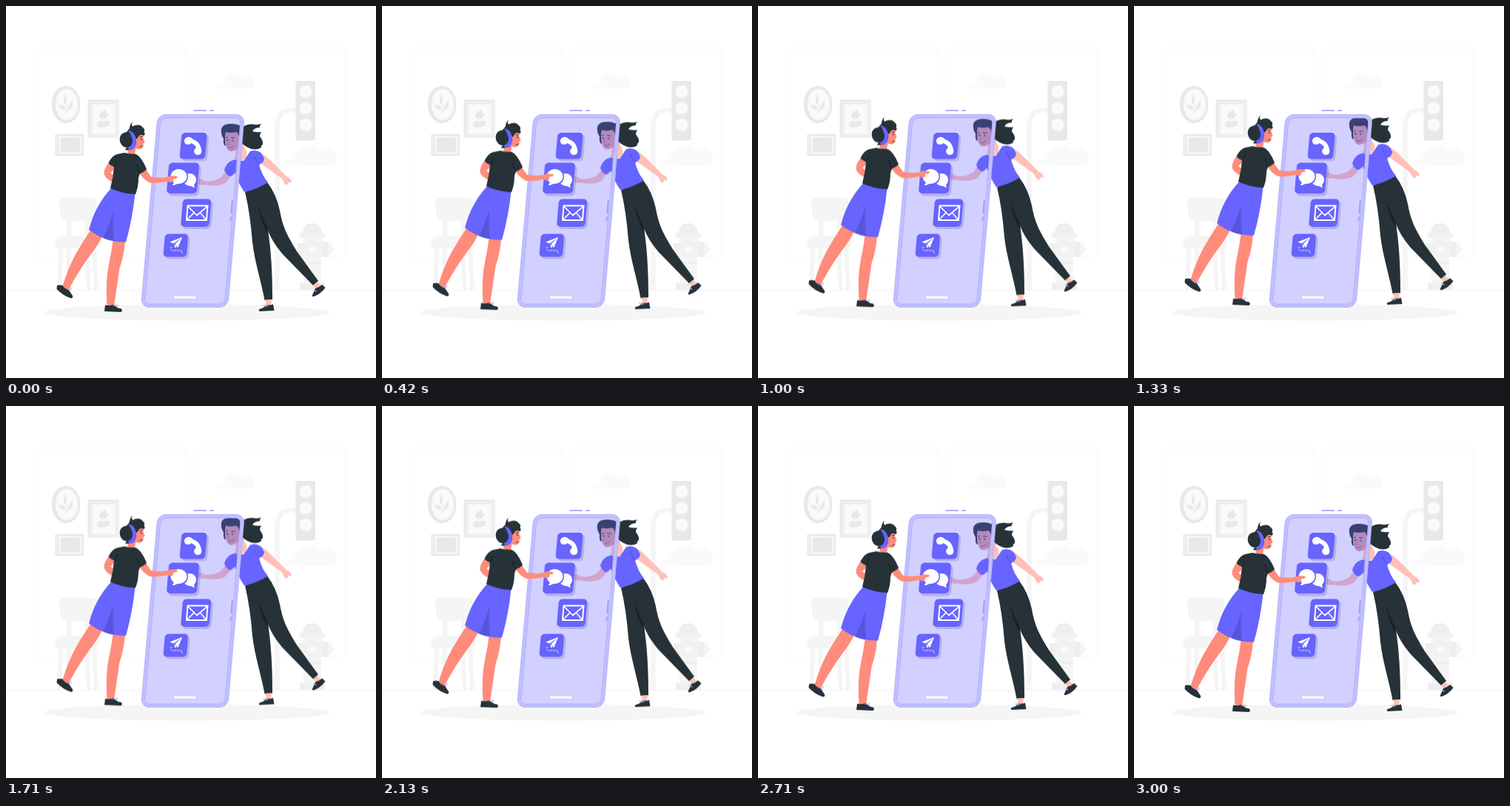
Recreate the animation shown at these times as an HTML page. Size 500 by 502 pixels, loop 3.04 s.

```html
<!DOCTYPE html>
<html lang="en">
<head>
<meta charset="utf-8">
<title>Calling through the phone</title>
<style>
html, body { margin: 0; width: 100%; height: 100%; overflow: hidden; background: #fff; }
svg { display: block; width: 500px; height: 502px; }
.float { animation: float 3040ms linear infinite; }
@keyframes float {
  0%, 98.68%, 100% { transform: translateY(0); }
  49.34% { transform: translateY(-10px); }
}
.line { fill: none; stroke-linecap: round; stroke-linejoin: round; }
.violet { fill: #6764ff; }
.dark { fill: #263238; }
.coral { fill: #ff8b7b; }
.pink { fill: #ffc0b7; }
.g1 { fill: #e8e8e8; }
.g2 { fill: #efefef; }
.g3 { fill: #f5f5f5; }
.g4 { fill: #fafafa; }
</style>
</head>
<body>
<svg viewBox="0 0 500 502">
  <defs>
    <g id="bubble">
      <ellipse rx="11" ry="10"/>
      <path d="M-7 5Q-6 9 -9 12Q-3 12 0 8z"/>
    </g>
  </defs>

  <!-- room and street -->
  <g class="line" stroke="#f9f9f9">
    <path d="M39.500 57H242V338H39.500zM255 57H458V338H255z"/>
    <path d="M0 383.500H500" stroke="#f4f4f4"/>
  </g>

  <g id="pictures">
    <ellipse class="g1" cx="81" cy="133" rx="19.300" ry="25.300"/>
    <ellipse class="g3" cx="82" cy="133" rx="15.500" ry="21.500"/>
    <ellipse class="g4" cx="82" cy="133" rx="14" ry="20"/>
    <path class="line" d="M82 143Q80 132 80 122M82 143Q76 140 73 133M82 143Q88 138 89 131" stroke="#e8e8e8"/>
    <path class="g1" d="M80 133Q76 126 80 120Q85 127 80 133zM81 140Q73 140 71 134Q78 133 81 140zM83 141Q84 131 90 127Q92 137 83 141z"/>
    <path class="g1" d="M110.500 126.500H152.500V177.500H110.500z"/>
    <path class="g2" d="M113 129H152.500V177.500H113z"/>
    <path class="g4" d="M117 133H147.500V172.500H117z"/>
    <path class="g1" d="M133 140L139 147L134 152Q126 153 126 146zM122 160Q127 153 132 156Q137 152 141 158Q137 165 130 163Q125 166 122 160z"/>
    <path class="g1" d="M66.500 173H105V202H66.500z"/>
    <path class="g3" d="M71 175H103V200H71z"/>
    <path class="g1" d="M74.500 178H99.500V197H74.500z"/>
    <path class="g2" d="M67.500 174H70V201H67.500z"/>
  </g>

  <g id="chair">
    <path class="g3" d="M82 286H88.500V313H82zM107 286H113V313H107z"/>
    <path class="g3" d="M78 259H116Q123 259 122.500 266L121 284Q120.500 290 114 290H81Q75 290 74 284L72 266Q72 259 78 259z"/>
    <path class="g3" d="M71 322H78L75 383.500H68.500zM82 322H88L87 383.500H81zM106 322H112L115 383.500H109zM116 322H122L125 383.500H119z"/>
    <path class="g3" d="M66 319Q68 310 80 310H114Q125 310 126 319Q126 327 118 327H72Q64 327 66 319z"/>
  </g>

  <g id="street">
    <path class="g4" d="M283 110Q286 104 295 104Q298 90 308 90Q315 90 317 97Q325 91 332 95Q337 100 335 108Q333 112 325 112H285z"/>
    <path class="g4" d="M376 215Q378 209 386 207Q389 195 398 196Q404 186 414 188Q420 189 422 196Q436 187 445 197Q449 206 445 212Q441 216 432 216z"/>
    <path class="line" style="stroke-linecap:butt" d="M393 140.500H385Q366.500 141 366.500 163V383.500" stroke="#f5f5f5" stroke-width="6.500"/>
    <rect class="g1" x="391.500" y="101" width="26.500" height="80.500" rx="2"/>
    <g class="g2"><circle cx="405" cy="116" r="9"/><circle cx="405" cy="138.500" r="9"/><circle cx="405" cy="161" r="9"/></g>
    <g class="g4"><circle cx="405" cy="115" r="8"/><circle cx="405" cy="137.500" r="8"/><circle cx="405" cy="160" r="8"/></g>
    <g id="hydrant">
      <path class="g3" d="M402 317H426V383.500H402z"/>
      <path class="g2" d="M401 307Q402 293 414 293Q426 293 427 307zM397 306H431V312H397zM397 374H431V383.500H397zM394 320H402V338H394zM426 318H436V339H426z"/>
      <path class="g3" d="M436 321H440L443 328L440 335H436zM400 312H428V318H400z"/>
      <path class="g2" d="M402 344H426V348H402z"/>
      <circle class="g2" cx="414" cy="328" r="11"/>
      <circle class="g3" cx="414" cy="328" r="7.500"/>
      <circle cx="414" cy="328" r="2.500" fill="#fff"/>
    </g>
  </g>

  <ellipse class="g3" cx="245" cy="413.500" rx="193" ry="11"/>

  <!-- woman behind the phone -->
  <g class="float">
    <path class="dark" d="M314 168Q322 159 333 159.500Q340 161 345 159Q342 162 343 164Q336 164 333 169Q339 171 345 170Q343 173 343 176Q348 182 347 187Q344 188 345 191Q337 196 327 191Q320 187 316 184z"/>
    <path class="pink" d="M342 197Q350 201 357 208L379 230Q385 232 386 237Q383 240 381 237Q382 241 378 241.500Q374 236 373 233L345 213z"/>
    <path class="pink" d="M297 223L291 231Q280 238 268 236Q263 232 259.500 233Q262 236 259 238Q261 243 268 241Q284 245 296 239Q302 233 306 226z"/>
    <path class="dark" d="M323 251L353 238Q365 253 370 276C374 298 379 308 393 331L422 371L415 377L373 334Q359 317 354 303Q360 340 360 396L349.500 397C345 372 336 345 333 319Q330 280 323 251z"/>
    <path d="M341 271Q345 294 355 309L353 299Q347 287 341 271z" fill="#172126"/>
    <path class="pink" d="M350.500 396.500L359 396L358 405L352 405zM415 377L421 372.500L426 379L420 383z"/>
    <path class="dark" d="M342.500 409Q350 407 351 403.500Q356 404.500 361 402.500L362.500 411L342.500 412Q341 411 342.500 409zM414 390Q417 384 418 381Q423 380 427 376L431.500 380Q425 389 416 392Q413 392.500 414 390z"/>
    <path class="line" d="M348 404L353 405M416 383L419 385" stroke="#aaa9ff" stroke-width="1.300"/>
    <path class="violet" d="M310 207L321 209L330 196Q344 192 349 206Q348 212 342 214Q346 229 354 238Q340 247 322 251Q314 239 309 225Q306 230 302 230Q296 226 295 221Q298 212 304 209z"/>
    <path class="line" d="M342 214Q337 209 336 203M310 225Q310 219 313 215" stroke="#4c48d8" stroke-width=".8"/>
    <path class="pink" d="M309 188Q312 199 309 207Q317 212 323 206Q326 201 325 195Q321 192 321 184z"/>
    <path d="M296.500 169Q295 184 299 193Q303 199 310 194Q316 192 317 183V167z" fill="#d69c9f"/>
    <path class="dark" d="M291 166Q293 159 303 159Q316 158 322 167Q324 176 321 187Q317 185 315 178Q315 172 311 170Q303 172 297 170Q295 177 297 189Q293 188 294 179Q290 173 291 166z"/>
    <g class="line" stroke="#263238" stroke-width="1">
      <path d="M297 178L299.500 177M304.500 177.500L309 178"/>
      <path d="M301 181L299.500 187H302" stroke="#b96d70" stroke-width=".8"/>
      <path d="M301 191Q305 192.500 308 189" stroke="#a4485a"/>
    </g>
    <circle class="dark" cx="299" cy="181" r="1"/><circle class="dark" cx="306" cy="181.500" r="1"/>
  </g>

  <!-- phone: clear screen in a solid rim -->
  <g transform="translate(24.150 0) skewX(-5)">
    <rect class="violet" x="198.400" y="151" width="108" height="251" rx="7" opacity=".3"/>
    <rect class="line" x="196.150" y="148.750" width="112.500" height="255.500" rx="9" stroke="#c1bfff" stroke-width="5.200"/>
    <rect class="line" x="193.700" y="146.300" width="117.400" height="260" rx="11" stroke="#aaa7f8" stroke-width=".6"/>
    <rect class="line" x="198.400" y="151" width="108" height="251" rx="7" stroke="#aaa7f8" stroke-width=".6"/>
    <path class="line" d="M304.600 263V279M304.600 285V289.500" stroke="#a4a1f8" stroke-width="2"/>
  </g>
  <path class="line" d="M254 141.200H270M276 141.200H280" stroke="#a9a6f5" stroke-width="1.800"/>
  <path class="line" d="M228.500 393.200H255" stroke="#fff" stroke-width="3"/>

  <!-- app tiles -->
  <g transform="translate(24.900 0) skewX(-5)">
    <g fill="#5b58a8" opacity=".25">
      <rect x="230.500" y="174" width="34.500" height="35.500" rx="5"/>
      <rect x="217" y="215" width="41" height="41.500" rx="5"/>
      <rect x="240" y="263.500" width="38.500" height="37.500" rx="5"/>
      <rect x="220" y="310.500" width="31.500" height="31" rx="5"/>
    </g>
    <g class="violet">
      <rect x="227.500" y="171" width="34.500" height="35.500" rx="5"/>
      <rect x="214" y="211.500" width="41" height="41.500" rx="5"/>
      <rect x="237" y="260.500" width="38.500" height="37.500" rx="5"/>
      <rect x="217" y="307.500" width="31.500" height="31" rx="5"/>
    </g>
  </g>
  <path d="M241 183Q240 178 247 176.500Q251 177 253 180Q262 183 264 193Q265.500 200 260 201Q254.500 201 254 196Q254.500 192.500 257 191Q255 187 250.500 185Q249 187.500 246 187Q241.500 186.500 241 183z" fill="#fff"/>
  <g fill="#fff">
    <use href="#bubble" transform="translate(248.500 234.500) scale(-.78 .85)"/>
    <circle class="violet" cx="234" cy="230" r="12"/>
    <use href="#bubble" x="233.500" y="230"/>
  </g>
  <g class="line" stroke="#fff" stroke-width="2">
    <path d="M245.500 269.500H272.500L271 289H244z"/>
    <path d="M245.500 270L258 282.500L272.500 270M244.500 288.500L254 279M270.500 288.500L262.500 279" stroke-width="1.700"/>
  </g>
  <g transform="translate(1 0)">
    <path d="M220 318.500L237 312L231.500 326L227.500 321.500L235 313.500L225.500 320.500zM226.500 321.500L230 325L227 326z" fill="#fff"/>
    <path class="line" d="M222 325Q220 330 225 330H235Q238 331 236.500 335" stroke="#fff" stroke-width="1" stroke-dasharray="1.300 2"/>
  </g>

  <!-- woman in front -->
  <g class="float">
    <path class="coral" d="M114 303L131 309Q125 322 114 336Q99 356 84 384L76.500 378Q84 353 94 335Q103 319 114 303zM145 313L161 316Q160 335 153.500 354L146 405H136.500Q134 370 139.500 346Q143 330 145 313z"/>
    <path class="dark" d="M69 377Q73 376 76.500 377Q79 382 84 382L90 391Q91 394 88 394.500Q77 391 68.500 382zM134 403.500Q140 405 146 403Q150 408 156 408.500Q158 412 155 413L133 412z"/>
    <path class="line" d="M82 382L87 383L88 380M145 404L150 405L150 402" stroke="#aaa9ff" stroke-width="1.100"/>
    <path class="coral" d="M140 210Q132 219 132.500 227Q135 234 145 238L149 231L141 225Q148 220 150 211z"/>
    <path class="coral" d="M178 222Q184 233 194 238.500Q207 240 218 236.500Q222 239 225 237.500Q227 235 226 233.500L231 232.500Q233 230.500 230 229.500L222 229Q218 231 214 231.500Q203 232 196 230.500Q190 223 187 216z"/>
    <path class="violet" d="M142 246L174.500 253Q171 287 162 318.500Q134 319 112 302Q120 270 142 246z"/>
    <path d="M145 278Q139 298 131 313Q138 316 145.500 317Q144 296 145 278z" fill="#5754db"/>
    <path class="coral" d="M167 187L164 198Q169 202 174 199L176 191z"/>
    <path class="dark" d="M160 198Q167 200 175 199.500Q183 203 190 220Q187 224 181 226L179 232Q179 244 175 254Q156 253 141 246Q145 231 146 217Q141 215 138.500 212Q143 202 150 200z"/>
    <path class="line" d="M146 217Q149 214 150 209M181 226Q178 222 177 215" stroke="#10181b" stroke-width=".8"/>
    <path class="coral" d="M172 172L184 171Q185 178 187.500 183.500Q187.500 185.500 185.500 185.500Q186 191 182 193Q178 194 174 191.500L168 187z"/>
    <path class="dark" d="M167 165Q167 160 171 156.500Q169 160 171 162.500Q180 158 185 164Q188.500 167 186.500 170Q189 173 186 175Q182 172 179 176Q177 181 175 180Q172 186 171 190Q166 196 161 194L163 191Q156 190 154 183Q152 172 163 170z"/>
    <path class="coral" d="M173 181Q176 177 178 181Q177 186 174 187z"/>
    <path class="violet" d="M165 167.500Q173 169 175.500 178Q178 188 172 193Q167 196 164 191Q172 189 171 180Q169 173 165 167.500z"/>
    <path class="line" d="M181 177L185 176M181 190Q183 190.500 185 189" stroke="#263238" stroke-width=".9"/>
    <circle class="dark" cx="183" cy="180" r=".9"/>
  </g>
</svg>
</body>
</html>
```
